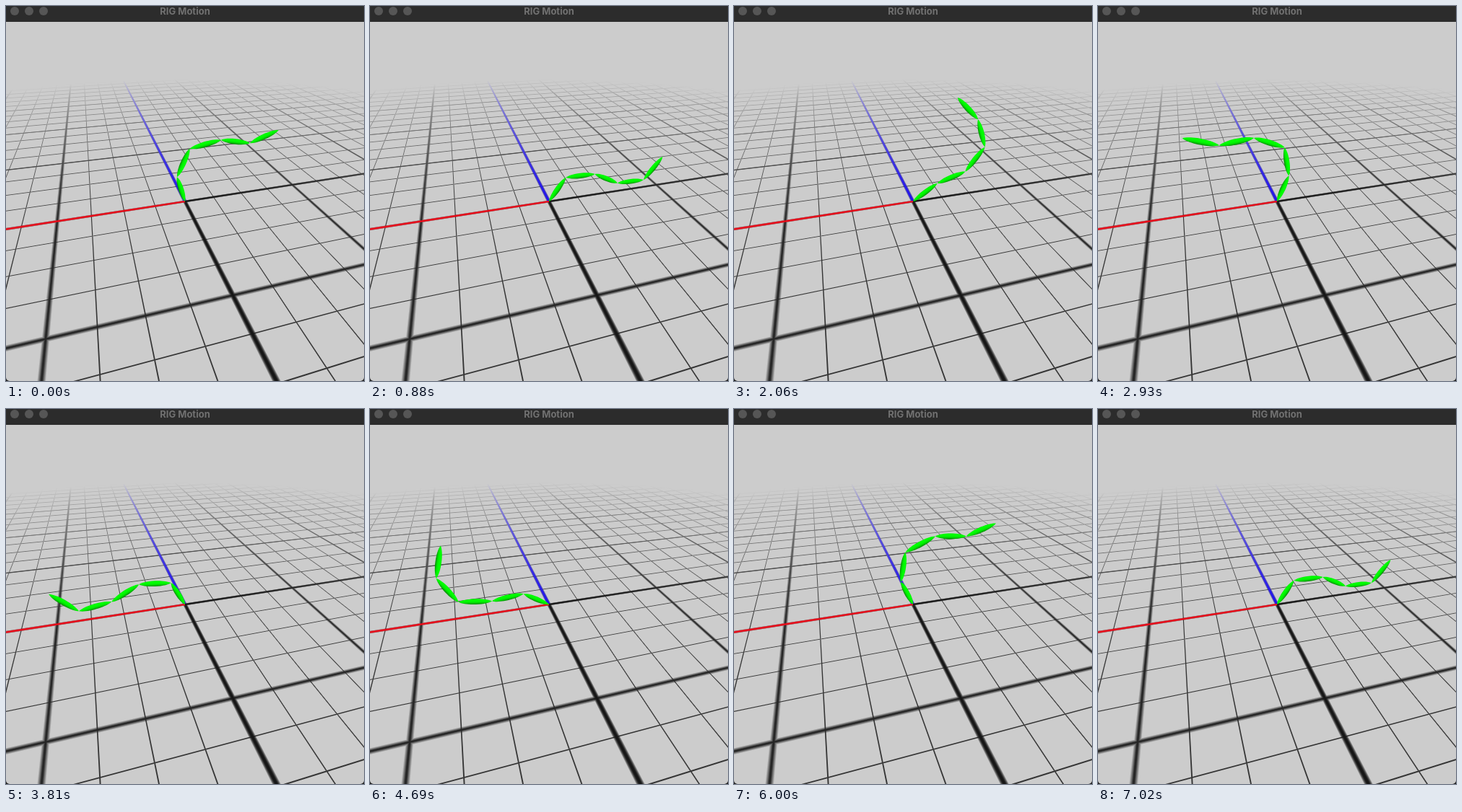
An HTML page with a canvas that plays this animation: 496 px wide and 520 px high, repeating every 7120 ms.

```html
<!DOCTYPE html>
<html lang="en">
<head>
<meta charset="utf-8">
<title>Swinging chain</title>
<style>
  html, body { margin: 0; width: 100%; height: 100%; overflow: hidden; background: #1c1c1c; }
  #window { position: relative; width: 496px; height: 520px; overflow: hidden; border-radius: 0 0 5px 5px; }
  canvas { position: absolute; left: 0; top: 0; }
  #bar {
    position: absolute; left: 0; top: 0; width: 496px; height: 22px; background: #2c2c2c;
    color: #717171; font: bold 13px/14px Inter, sans-serif; text-align: center;
  }
  #bar i { position: absolute; top: 1px; width: 12px; height: 12px; border-radius: 50%; background: #565656; }
</style>
</head>
<body>
<div id="window">
  <canvas id="floor" width="496" height="520"></canvas>
  <canvas id="chain" width="496" height="520"></canvas>
  <div id="bar"><i style="left:6px"></i><i style="left:26px"></i><i style="left:46px"></i>RIG Motion</div>
</div>
<script>
const W = 496, H = 520, CX = 248, CY = 271;
const LOOP = 7120, STEP = 146.3, STEPS_PER_SWING = 42;
const BACKGROUND = 204;
const EYE = { x: 2.34, y: 5.77, z: -8.27 };

const clamp = v => Math.max(0, Math.min(1, v));

// Screen point to floor coordinates (x along red, z along blue).
function toFloor(sx, sy) {
  const dx = sx - CX, dy = sy - CY;
  const x = (-22.39 * dx + 11.4 * dy) / 976;
  const z = (-6.27 * dx - 40.4 * dy) / 976;
  const w = 1 / (1 + 0.0218 * x - 0.078 * z);
  return [x * w, z * w];
}

// Point in the upright plane through the red axis to the screen.
function project(x, y) {
  const w = 1 - 0.0218 * x - 0.0539 * y;
  return { x: CX - 40.4 * x / w, y: CY + (6.27 * x - 34.56 * y) / w, scale: 41.6 / w };
}

const gap = (v, every) => Math.abs(v - every * Math.round(v / every));
const cover = (distance, radius, soft) => clamp((radius - distance) / soft + 0.5);
const thin = (v, px) => cover(gap(v, 1), Math.max(0.012, 0.4 * px), px);
const thick = (distance, px) => cover(distance, 0.045, Math.max(px, 0.065));

function drawFloor() {
  const ctx = document.getElementById('floor').getContext('2d');
  const image = ctx.createImageData(W, H);
  for (let row = 0, k = 0; row < H; row++) {
    for (let col = 0; col < W; col++, k += 4) {
      const sx = col + 0.5, sy = row + 0.5;
      const [x, z] = toFloor(sx, sy);
      const [xr, zr] = toFloor(sx + 1, sy);
      const [xd, zd] = toFloor(sx, sy + 1);
      const px = Math.hypot(xr - x, xd - x), pz = Math.hypot(zr - z, zd - z);
      const fade = clamp((27 - Math.hypot(x - EYE.x, EYE.y, z - EYE.z)) / 17);
      const rgb = [BACKGROUND, BACKGROUND, BACKGROUND];
      const blend = (alpha, ...ink) => ink.forEach((v, c) => rgb[c] += (v - rgb[c]) * alpha);

      if (fade > 0) {
        blend(Math.max(thin(x, px), thin(z, pz)) * 0.9, 35, 35, 35);
        blend(Math.max(thick(gap(x, 4), px), thick(gap(z, 4), pz)) * 0.95, 36, 36, 36);
        blend(thick(Math.abs(x), px), ...(z > 0 ? [25, 10, 250] : [22, 22, 22]));
        blend(thick(Math.abs(z), pz), ...(x > 0 ? [250, 5, 20] : [16, 16, 16]));
        blend(1 - fade, BACKGROUND, BACKGROUND, BACKGROUND);
      }
      image.data.set([...rgb, 255], k);
    }
  }
  ctx.putImageData(image, 0, 0);
}

const pen = document.getElementById('chain').getContext('2d');

function drawBone(a, b) {
  const dx = b.x - a.x, dy = b.y - a.y, length = Math.hypot(dx, dy);
  const half = length / 2, radius = 0.085 * (a.scale + b.scale) / 2;
  pen.save();
  pen.translate((a.x + b.x) / 2, (a.y + b.y) / 2);
  pen.rotate(Math.atan2(dy, dx));
  // Keep the shaded side away from a light above and to the right.
  const shadeSide = dy * 0.5 + dx * 0.85 > 0 ? 1 : -1;
  const shade = pen.createLinearGradient(0, -radius * shadeSide, 0, radius * shadeSide);
  shade.addColorStop(0, '#00f400');
  shade.addColorStop(0.3, '#00ff00');
  shade.addColorStop(0.6, '#00f000');
  shade.addColorStop(1, '#008a00');
  pen.fillStyle = shade;
  pen.beginPath();
  pen.moveTo(-half, 0);
  for (const side of [1, -1]) {
    const bulge = side * radius * 4 / 3;
    pen.bezierCurveTo(-side * half * 0.6, bulge, side * half * 0.6, bulge, side * half, 0);
  }
  pen.fill();
  pen.restore();
}

function drawChain(step) {
  const swing = 2 * Math.PI * (step - 12.25) / STEPS_PER_SWING;
  let x = 0, y = 0, angle = 0, joint = project(0, 0);
  pen.clearRect(0, 0, W, H);
  for (let i = 0; i < 5; i++) {
    angle -= Math.cos(swing + i);
    x += Math.sin(angle);
    y += Math.cos(angle);
    const next = project(x, y);
    drawBone(joint, next);
    joint = next;
  }
}

const start = performance.now();
function tick() {
  const time = (performance.now() - start) % LOOP;
  drawChain(Math.floor(time / STEP + 0.02));
  requestAnimationFrame(tick);
}

drawFloor();
tick();
</script>
</body>
</html>
```
